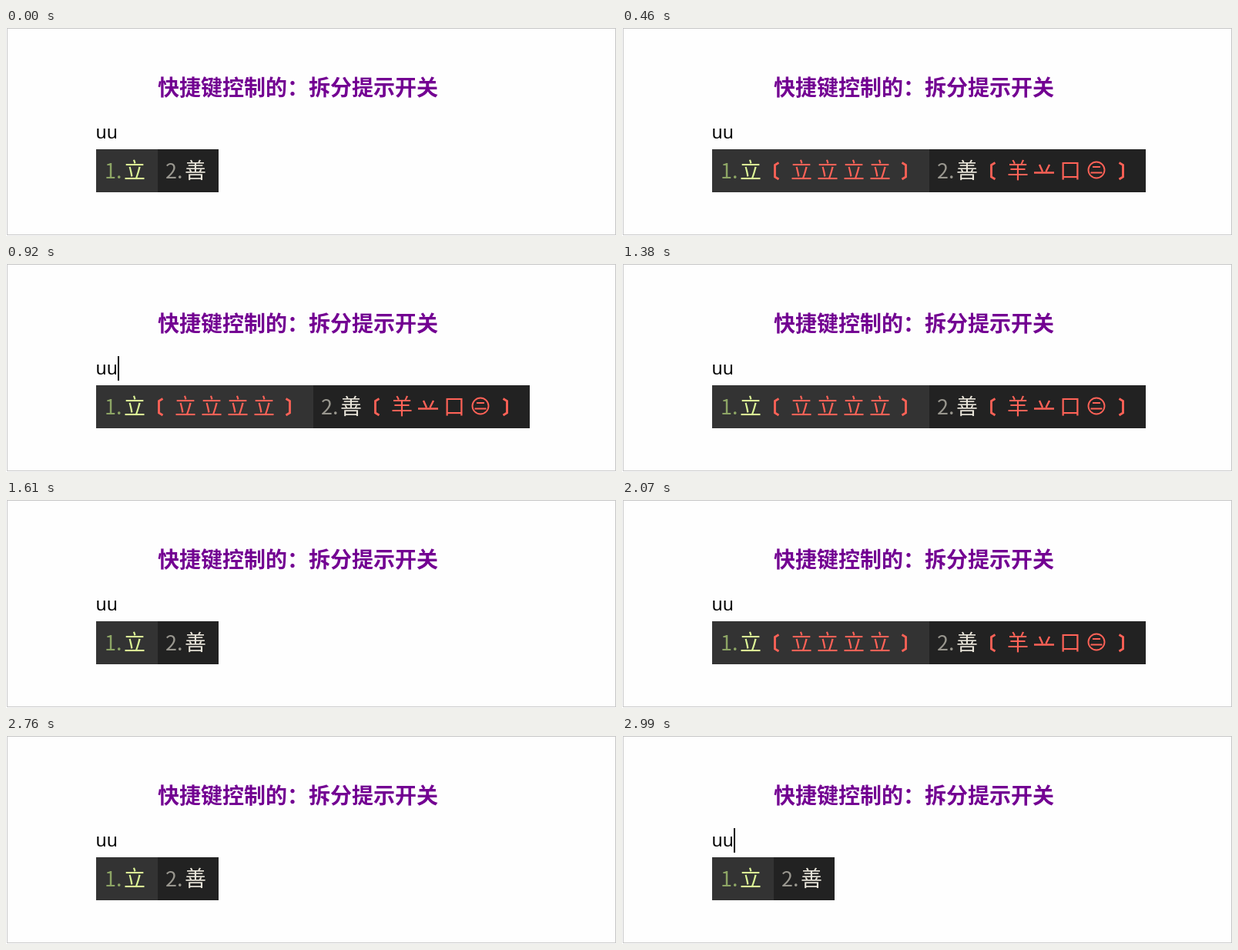
These frames come from a looping animation (792x271 px, 3.45 s). An HTML page:

```html
<!DOCTYPE html>
<html lang="zh-CN">
<head>
<meta charset="utf-8">
<title>拆分提示开关</title>
<style>
html, body { margin: 0; width: 100%; height: 100%; overflow: hidden; background: #fff; }
svg { display: block; width: 792px; height: 271px; }
text { font-family: "Noto Sans CJK SC", "Noto Sans CJK", "Noto Sans", sans-serif; font-size: 28px; }
.title { font-weight: 700; fill: #730092; }
.typed { font-family: "Noto Sans", "Open Sans", sans-serif; font-size: 23px; }
.num { font-size: 27px; }
.mid { text-anchor: middle; fill: #ff6257; }
.line { fill: none; stroke: #ff6257; stroke-width: 2.2; }
</style>
</head>
<body>
<svg viewBox="0 0 792 271">
  <rect x="1.5" y="0.5" width="790" height="269" fill="#fefefe" stroke="#c6c6c6"/>
  <text class="title" x="197" y="88">快捷键控制的：拆分提示开关</text>
  <text class="typed" x="116.5" y="144">uu</text>
  <rect id="caret" x="145" y="120" width="2" height="32"/>
  <rect id="cell1" x="117" y="158" height="56" fill="#333"/>
  <rect id="cell2" y="158" height="56" fill="#222"/>
  <text class="num" x="128" y="196" fill="#8da565">1.</text>
  <text x="153" y="196" fill="#dcf596">立</text>
  <g id="second">
    <text class="num" x="207" y="196" fill="#99978f">2.</text>
    <text x="232" y="196" fill="#e8e4d9">善</text>
  </g>
  <g id="hints"></g>
</svg>
<script>
const LOOP = 3450;
const el = id => document.getElementById(id);
const within = (t, spans) => spans.some(([a, b]) => t >= a && t < b);

const openSpans = [[460, 1610], [2070, 2760]];
const caretSpans = [[920, 1380], [2990, LOOP]];

const glyph = (ch, x) => `<text class="mid" x="${x}" y="195.5">${ch}</text>`;
const line = (d, w = 2.2) => `<path class="line" stroke-width="${w}" style="stroke-width:${w}" d="${d}"/>`;
// dir: 1 opens, -1 closes
const bracket = (x, dir) =>
  line(`M${x + 5 * dir} 175.5L${x} 178.5V194L${x + 5 * dir} 197`, 2.8);

el('hints').innerHTML = [
  bracket(198.5, 1),
  ...[0, 1, 2, 3].map(i => glyph('立', 233 + 34 * i)),
  bracket(368.5, -1),
  bracket(479.5, 1),
  glyph('羊', 514),
  line('M535 188.5H561M542 178L546 187M555 178L550.5 187', 2.4),
  glyph('口', 582),
  line('M605.5 185a10.5 10.5 0 1 0 21 0a10.5 10.5 0 1 0 -21 0M611 181H621M608.5 188.5H623.5', 1.9),
  bracket(650.5, -1)
].join('');

function setCells(split, end) {
  el('cell1').setAttribute('width', split - 117);
  el('cell2').setAttribute('x', split);
  el('cell2').setAttribute('width', end - split);
}

function draw(t) {
  const open = within(t, openSpans);
  setCells(open ? 399 : 197, open ? 680 : 276);
  el('second').setAttribute('transform', `translate(${open ? 202 : 0} 0)`);
  el('hints').style.display = open ? '' : 'none';
  el('caret').style.display = within(t, caretSpans) ? '' : 'none';
}

const start = performance.now();
function tick() {
  draw((performance.now() - start) % LOOP);
  requestAnimationFrame(tick);
}
tick();
</script>
</body>
</html>
```
